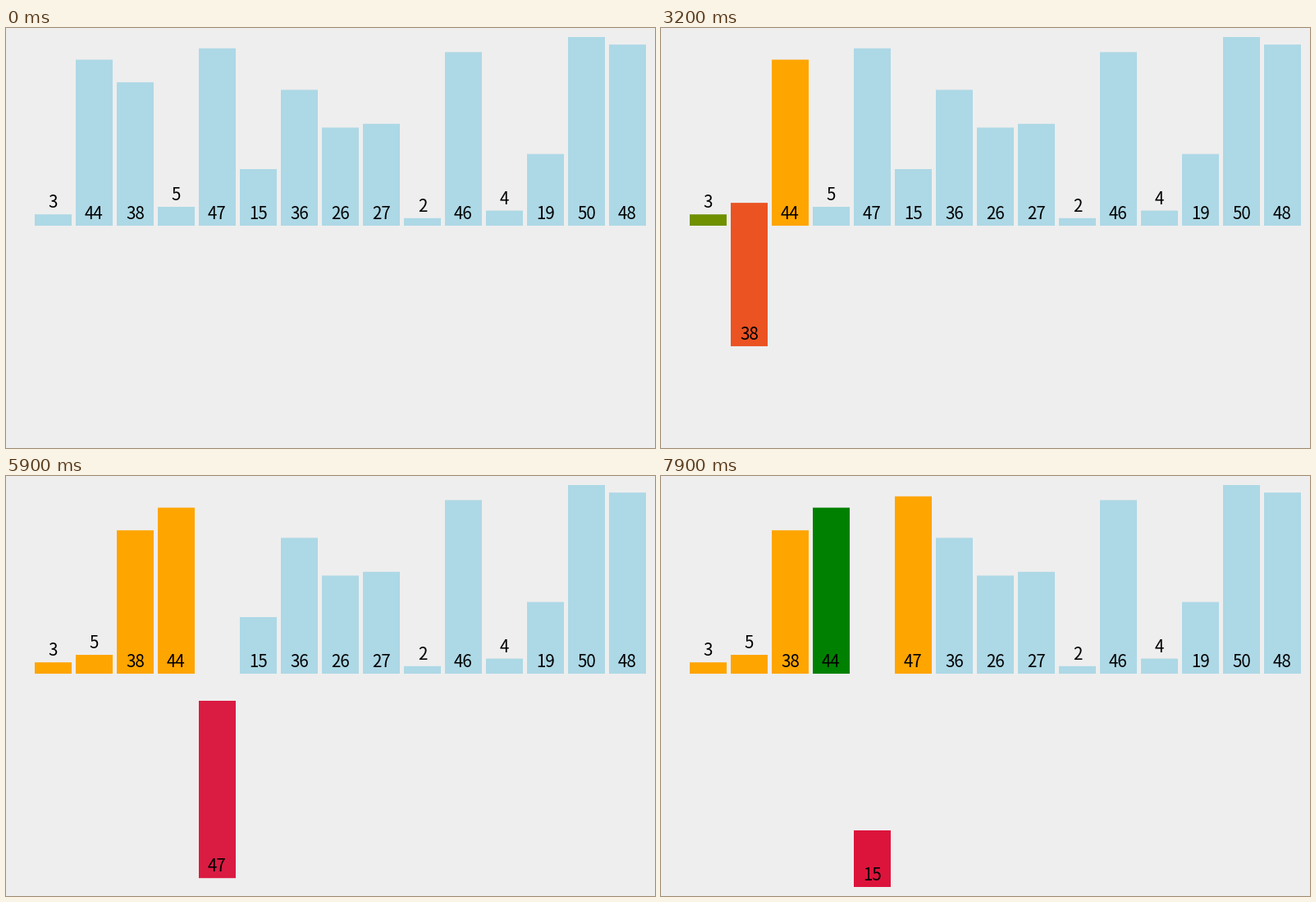
A matplotlib script for the animation above (8 s loop, 791 px wide and 512 px high).

```python
import numpy as np
import matplotlib.pyplot as plt
from matplotlib.animation import FuncAnimation
from matplotlib.colors import to_rgb
from matplotlib.patches import Rectangle

W, H, DPI = 791, 512, 100
FRAMES, TICK = 80, 100
VALUES = [3, 44, 38, 5, 47, 15, 36, 26, 27, 2, 46, 4, 19, 50, 48]

LEFT, PITCH, BAR_W = 35, 50, 45
BASE, DROP, UNIT = 241, 260, 4.6
FADE = 220  # ms per transition
STARTS = [455, 780, 1100, 1453, 1780, 2111, 2440, 2790, 3095, 3426, 3755, 4084,
          4413, 4741, 5058, 5390, 5728, 6057, 6383, 6714, 7010, 7371, 7697]

IDLE, SORTED, COMPARE, PICKED = map(
    to_rgb, ("lightblue", "orange", "green", "crimson"))


def sort_states():
    """Yield (slot, drop, r, g, b) per bar after every insertion sort step."""
    n = len(VALUES)
    slot, drop, color = list(range(n)), [0] * n, [IDLE] * n
    order = list(range(n))

    def snap():
        return np.column_stack([slot, drop, np.array(color)])

    yield snap()
    color[0] = SORTED
    yield snap()
    for i in range(1, n):
        key = order[i]
        color[key], drop[key] = PICKED, 1
        yield snap()
        j, last = i, None
        while j > 0:
            if last is not None:
                color[last] = SORTED
            last = order[j - 1]
            color[last] = COMPARE
            yield snap()
            if VALUES[last] <= VALUES[key]:
                break
            order[j - 1], order[j] = key, last
            slot[key], slot[last] = j - 1, j
            j -= 1
            yield snap()
        color[last] = color[key] = SORTED
        drop[key] = 0
        yield snap()


STATES = [s for s, _ in zip(sort_states(), range(len(STARTS) + 1))]


def ease(t):
    t = min(max(t, 0), 1)
    return 4 * t**3 if t < 0.5 else 1 - 4 * (1 - t)**3


def state_at(ms):
    k = int(np.searchsorted(STARTS, ms, side="right"))
    if k == 0:
        return STATES[0]
    p = ease((ms - STARTS[k - 1]) / FADE)
    return STATES[k - 1] * (1 - p) + STATES[k] * p


fig = plt.figure(figsize=(W / DPI, H / DPI), dpi=DPI, facecolor="#eeeeee")
ax = fig.add_axes([0, 0, 1, 1])
ax.set_xlim(0, W)
ax.set_ylim(H, 0)
ax.axis("off")

bars, labels = [], []
for v in VALUES:
    bars.append(ax.add_patch(
        Rectangle((0, 0), BAR_W, v * UNIT, linewidth=0, snap=False)))
    labels.append(ax.text(0, 0, str(v), ha="center", va="baseline",
                          family="Noto Sans CJK JP", fontsize=20.5 * 72 / DPI))


def draw(frame):
    for v, bar, label, row in zip(VALUES, bars, labels, state_at(frame * TICK)):
        x = LEFT + PITCH * row[0]
        bottom = BASE + DROP * row[1]
        top = bottom - v * UNIT
        bar.set_xy((x, top))
        bar.set_facecolor(np.clip(row[2:], 0, 1))
        # short bars carry their label above
        label.set_position((x + BAR_W / 2, (top if v < 10 else bottom) - 8))
    return bars + labels


anim = FuncAnimation(fig, draw, frames=FRAMES, interval=TICK,
                     init_func=lambda: draw(0), repeat=True, repeat_delay=0)
plt.show()
```
